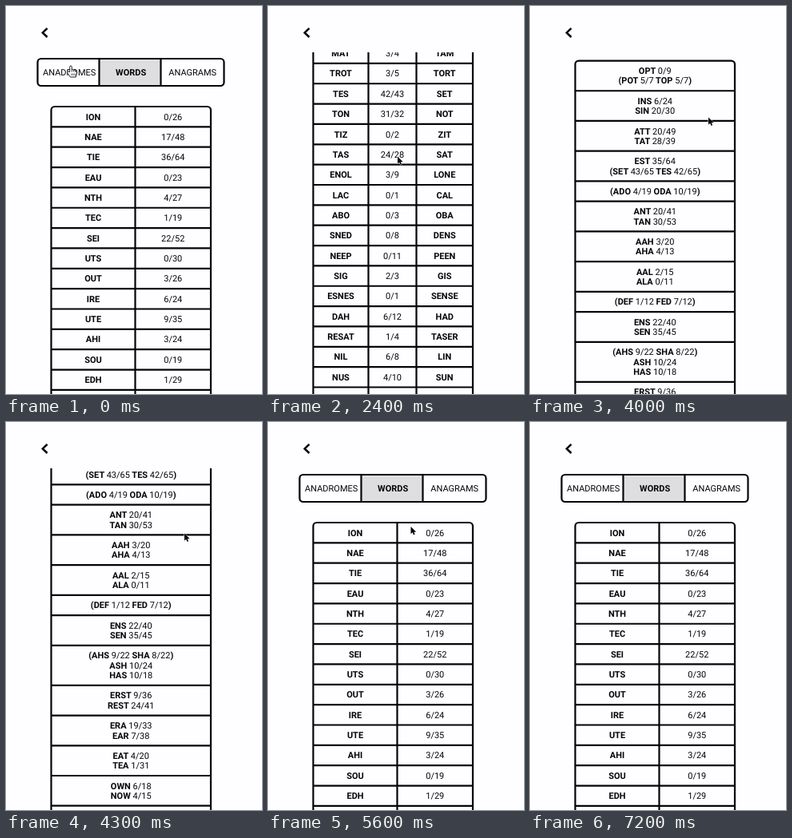
An HTML page that plays this animation: 320 px wide and 486 px high, repeating every 7300 ms.

```html
<!DOCTYPE html>
<html lang="en">
<head>
<meta charset="utf-8">
<title>Word lists</title>
<style>
html, body { margin: 0; width: 100%; height: 100%; overflow: hidden; background: #fefdff; }
svg { display: block; width: 100vw; height: 100vh; }
text { font: 400 11px Roboto, Arial, sans-serif; text-anchor: middle; fill: #050408; text-rendering: geometricPrecision; }
.b { font-weight: 700; }
.line { fill: none; stroke: #050408; stroke-width: 2.2; }
</style>
</head>
<body>
<svg viewBox="0 0 320 486">
  <clipPath id="view"><rect y="58" width="320" height="428"/></clipPath>
  <path class="line" d="M51.6 27.8L45.8 33.4L51.6 39" style="stroke-width:2.5"/>
  <g clip-path="url(#view)"><g id="page"></g></g>
  <path id="arrow" d="M0 .5V9.8L2.1 7.8L3.6 11L5.1 10.3L3.8 7.3H6.7Z" fill="#050408" stroke="#fff" stroke-width=".9" paint-order="stroke"/>
  <g id="hand" fill="#fff" stroke="#050408" stroke-width=".9" stroke-linejoin="round">
    <path d="M-1.3 7.5V1.3A1.3 1.3 0 0 1 1.3 1.3V5Q2.6 4 3.6 5.4Q5 4.7 5.8 6Q7.4 5.8 7.4 7.6V10L6.4 12V14H-.5L-4.3 8.9Q-5 7 -3.4 7Z"/>
    <path d="M1.3 5V7.6M3.6 5.4V7.6M5.8 6V7.9M1 9.5V12M3 9.5V12M5 9.5V12" fill="none" stroke-width=".7"/>
  </g>
</svg>
<script>
const LOOP = 7300, STEP = 100;
const TOP = 126, LEFT = 56.5, RIGHT = 256, PAD = 13, LEAD = 12.35, CAP = 3.9;
const BAR = { x: 39.5, y: 66, w: 233, h: 34, tab: 77 };

// Each tab opens on a click, scrolls down from "down" to "low", and back from "up" to "home".
const tabs = [
  { id: "anadromes", open: 1700, down: 2000, low: 2500, up: 2500, home: 2900, depth: 315, splits: [125.5, 185.5],
    rows: `ADO 4/10,AVO 0/1,RIF 0/4,STOT 1/9,SHA 8/9,DEF 1/7,OWT 7/8,NAV 1/6,MAT 3/4,TROT 3/5,TES 42/43,
      TON 31/32,TIZ 0/2,TAS 24/28,ENOL 3/9,LAC 0/1,ABO 0/3,SNED 0/8,NEEP 0/11,SIG 2/3,ESNES 0/1,DAH 6/12,
      RESAT 1/4,NIL 6/8,NUS 4/10,LAP,GUM,TEN` },
  { id: "words", open: 5300, down: 5800, low: 6050, up: 6200, home: 6600, depth: 418, splits: [161.5],
    rows: `ION 0/26,NAE 17/48,TIE 36/64,EAU 0/23,NTH 4/27,TEC 1/19,SEI 22/52,UTS 0/30,OUT 3/26,IRE 6/24,
      UTE 9/35,AHI 3/24,SOU 0/19,EDH 1/29,OES 21/47,EMO 0/14,TRET 0/45,MAE 1/22,EATEN 0/14,ESNE 2/28,
      LEU 1/17,SETAE 0/22,ODE 7/28,SAU 0/17,EME 0/16,EYE 3/25,OWE 6/24,ENATE 0/17,HOE 18/41,TAE,OHO,RET,NEE` },
  { id: "anagrams", open: 3600, down: 3900, low: 4200, up: 4200, home: 4700, depth: 221.5, splits: [],
    rows: `OPT 0/9|(POT 5/7 TOP 5/7),INS 6/24|SIN 20/30,ATT 20/49|TAT 28/39,EST 35/64|(SET 43/65 TES 42/65),
      (ADO 4/19 ODA 10/19),ANT 20/41|TAN 30/53,AAH 3/20|AHA 4/13,AAL 2/15|ALA 0/11,(DEF 1/12 FED 7/12),
      ENS 22/40|SEN 35/45,(AHS 9/22 SHA 8/22)|ASH 10/24|HAS 10/18,ERST 9/36|REST,ERA|EAR,EAT|TEA,OWN|NOW,
      HOE|OHE,ITS|SIT` }
];

const rest = { x: 81, y: 75 };
const glides = [
  { from: 200, to: 600, x: 79.5, y: 75 },
  { from: 1700, to: 2000, x: 162, y: 188 },
  { from: 2900, to: 3300, x: 224, y: 79 },
  { from: 3600, to: 3800, x: 223, y: 139 },
  { from: 4700, to: 5200, x: 166, y: 77 },
  { from: 5500, to: 5700, x: 191, y: 184 },
  { from: 6700, to: 7100, x: 188, y: -20 }
];

const $ = id => document.getElementById(id);
const bold = s => `<tspan class="b">${s}</tspan>`;
const label = (x, y, s, cls = "") => `<text class="${cls}" x="${x}" y="${y + CAP}">${s}</text>`;
const line = d => `<path class="line" d="${d}"/>`;
const frame = (x, y, w, h) => `<rect class="line" x="${x}" y="${y}" width="${w}" height="${h}" rx="4.5"/>`;
const isCount = s => /\d/.test(s);
const reverse = s => [...s].reverse().join("");

let seed = 7;
const random = n => (seed = seed * 16807 % 2147483647) % n;
function withCount(s) {
  const total = 12 + random(30);
  return isCount(s) ? s : `${s} ${random(total)}/${total}`;
}

function table(tab) {
  const cols = [LEFT, ...tab.splits, RIGHT];
  let y = TOP, out = "", rules = "";
  for (const row of tab.rows.split(/,\s*/)) {
    const lines = row.split("|").map(withCount), h = PAD + LEAD * lines.length, mid = y + h / 2;
    if (y > TOP) rules += `M${LEFT} ${y}H${RIGHT}`;
    if (tab.id === "anagrams") {
      lines.forEach((s, k) => {
        const rich = s.split(/(\d+\/\d+)/).map(p => isCount(p) ? p : bold(p)).join("");
        out += label((LEFT + RIGHT) / 2, mid + (k - (lines.length - 1) / 2) * LEAD, rich);
      });
    } else {
      const cells = lines[0].split(" ");
      if (tab.id === "anadromes") cells.push(reverse(cells[0]));
      cells.forEach((s, k) => {
        out += label((cols[k] + cols[k + 1]) / 2, mid, s, isCount(s) ? "" : "b");
      });
    }
    y += h;
  }
  for (const x of tab.splits) rules += `M${x} ${TOP}V${y}`;
  return out + line(rules) + frame(LEFT, TOP, RIGHT - LEFT, y - TOP);
}

function tabBar(active) {
  const { x, y, w, h, tab } = BAR;
  let out = "";
  tabs.forEach((t, i) => {
    const left = x + i * tab, on = t === active;
    const width = i < 2 ? tab : w - 2 * tab;
    if (on) out += `<rect x="${left}" y="${y}" width="${width}" height="${h}" rx="3" fill="#dedde0"/>`;
    if (i) out += line(`M${left} ${y}v${h}`);
    out += label(left + tab / 2 + 1.2, y + h / 2, t.id.toUpperCase(), on ? "b" : "");
  });
  return out + frame(x, y, w, h);
}

function ease(t, from, to) {
  const p = Math.min(1, Math.max(0, (t - from) / (to - from)));
  return p * p * (3 - 2 * p);
}

function cursorAt(t) {
  let { x, y } = rest;
  for (const g of glides) {
    const p = ease(t, g.from, g.to);
    x += (g.x - x) * p;
    y += (g.y - y) * p;
  }
  return { x, y };
}

for (const tab of tabs) tab.page = tabBar(tab) + table(tab);
const byTime = [...tabs].sort((a, b) => b.open - a.open);
let shown;

function draw(ms) {
  const t = Math.floor(ms % LOOP / STEP) * STEP;
  const tab = byTime.find(k => k.open <= t) || byTime[0];
  if (tab !== shown) $("page").innerHTML = (shown = tab).page;
  const scroll = tab.depth * (ease(t, tab.down, tab.low) - ease(t, tab.up, tab.home)) * (t >= tab.open);
  $("page").setAttribute("transform", `translate(0 ${-scroll})`);

  const { x, y } = cursorAt(t), barY = y + scroll - BAR.y;
  const overBar = y > 58 && barY > 0 && barY < BAR.h && x > BAR.x && x < BAR.x + BAR.w;
  for (const id of ["arrow", "hand"]) {
    $(id).setAttribute("transform", `translate(${x} ${y})`);
    $(id).setAttribute("visibility", (id === "hand") === overBar ? "visible" : "hidden");
  }
}

const start = performance.now();
function tick() {
  draw(performance.now() - start);
  requestAnimationFrame(tick);
}
tick();
</script>
</body>
</html>
```
